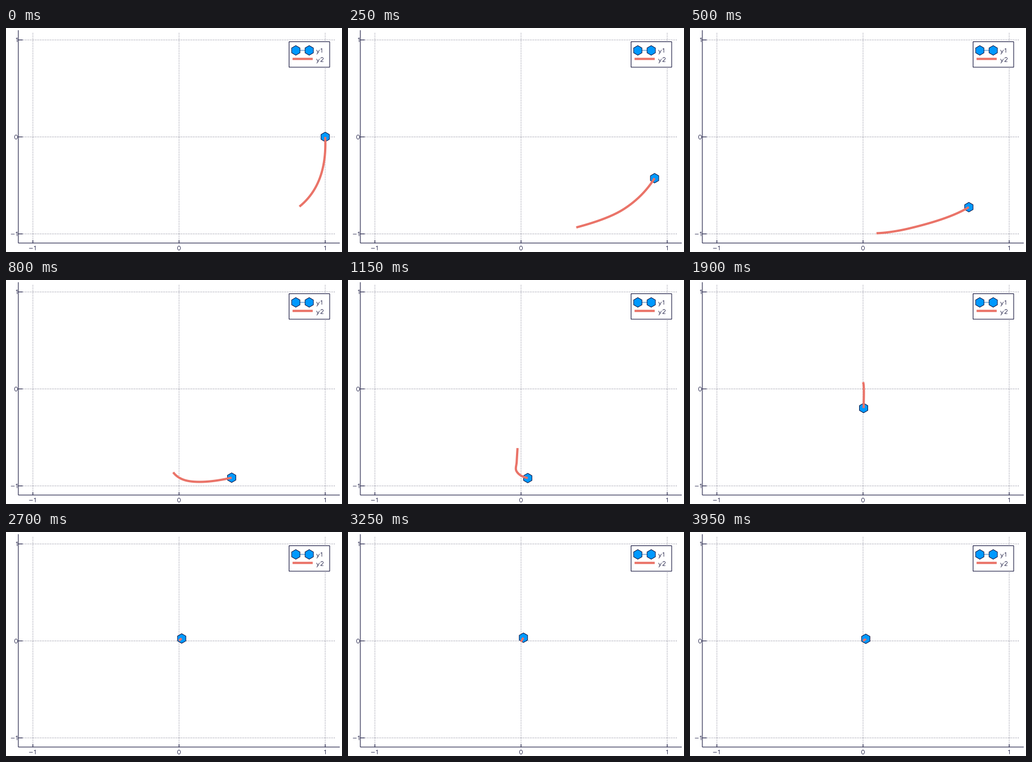
A matplotlib script for the animation above (4000 ms loop, 600 by 400 pixels).

```python
import numpy as np
import matplotlib.pyplot as plt
from matplotlib.animation import FuncAnimation
from matplotlib.patches import Rectangle, RegularPolygon

W, H, DPI = 600, 400, 100
PX = 72 / DPI
FRAMES, STEP, HORIZON = 80, 50, 10
INK, GRID, BLUE, RED = "#00002d", "#5c5c74", "#0099ff", "#ea7368"

plt.rcParams["path.snap"] = False

# waypoints: step, marker x, y, then where its forecast ends
T, *COLS = np.array([
    [0, 1, 0, .824, -.718],
    [10, .724, -.724, .092, -.993],
    [16, .36, -.915, -.04, -.86],
    [23, .046, -.919, -.024, -.61],
    [27, -.028, -.80, -.008, -.29],
    [30, -.022, -.676, 0, -.06],
    [38, .004, -.197, 0, .07],
    [46, .021, .01, 0, .02],
    [54, .018, .025, 0, .002],
    [80, .019, .02, 0, .002],
]).T


def spline(n, v):
    """Smooth curve through the waypoints v, sampled at steps n."""
    m = np.gradient(v, T, edge_order=2)
    n = np.clip(n, T[0], T[-1])
    i = np.clip(np.searchsorted(T, n, side="right") - 1, 0, len(T) - 2)
    h = T[i + 1] - T[i]
    u = (n - T[i]) / h
    blend = u * u * (3 - 2 * u)
    return (v[i] + blend * (v[i + 1] - v[i])
            + h * u * (1 - u) * ((1 - u) * m[i] - u * m[i + 1]))


def forecast(n):
    """The path ahead of step n, bent to reach the forecast end."""
    s = np.linspace(0, 1, 25)
    ahead = np.array([spline(n + HORIZON * s, v) for v in COLS[:2]])
    end = np.array([spline(n, v) for v in COLS[2:]])
    return ahead + s * (end - ahead[:, -1])[:, None]


def to_px(x, y):
    return 309 + 261 * x, 194.5 - 173.2 * y


fig = plt.figure(figsize=(W / DPI, H / DPI), dpi=DPI, facecolor="white")
ax = fig.add_axes([0, 0, 1, 1])
ax.set_xlim(0, W)
ax.set_ylim(H, 0)
ax.axis("off")


def stroke(x, y, color=INK, width=1, **kw):
    return ax.plot(x, y, color=color, lw=width * PX,
                   solid_capstyle="butt", **kw)[0]


def hexagon(x, y, z):
    return ax.add_patch(RegularPolygon((x, y), 6, radius=8.6, facecolor=BLUE,
                                       edgecolor=INK, lw=0.9 * PX, zorder=z))


# thin single-stroke glyphs: strokes above a baseline at 0, and the advance
ring = np.linspace(0, 2 * np.pi, 25)
bow = np.linspace(-np.pi, 0.6, 12)
GLYPHS = {
    "0": ([np.c_[2.7 + 2.7 * np.cos(ring), -4 + 4 * np.sin(ring)]], 8),
    "1": ([[(0, -6.4), (1, -6.8), (2.3, -8), (2.3, 0)]], 6),
    "2": ([[*np.c_[2.6 + 2.3 * np.cos(bow), -5.8 + 2.2 * np.sin(bow)],
            (0, 0), (5.2, 0)]], 8),
    "-": ([[(0, -3.7), (7, -3.7)]], 9.5),
    "y": ([[(0, -5.3), (2.7, 0)],
           [(5.4, -5.3), (2.7, 0), (1.6, 2), (0, 2.8)]], 7.8),
}


def label(text, x, y, size=0.93):
    for ch in text:
        lines, advance = GLYPHS[ch]
        for line in lines:
            gx, gy = size * np.transpose(line)
            stroke(x + gx, y + gy, width=0.75, zorder=8)
        x += size * advance


# grid, ticks and axes
dots = dict(color=GRID, linestyle=(0, (1, 2)), dash_capstyle="butt", zorder=1)
for v in (-1, 0, 1):
    x, y = to_px(v, v)
    stroke([x, x], [9, 384], **dots)
    stroke([22, 587], [y, y], **dots)
    stroke([x, x], [384, 379], zorder=3)
    stroke([22, 30], [y, y], zorder=3)
stroke([22, 22], [4, 384], zorder=2)
stroke([22, 596], [384, 384], zorder=2)

for text, x, y in (("-1", 41.3, 396.7), ("0", 306.4, 396.7), ("1", 568.3, 396.7),
                   ("1", 17.8, 25), ("0", 15.4, 198.4), ("-1", 8.8, 371.5)):
    label(text, x, y)

# legend
ax.add_patch(Rectangle((505.5, 24.5), 72.5, 45.5, facecolor="white",
                       edgecolor=INK, lw=PX, zorder=6))
stroke([511, 548], [40, 40], "#2f78c0", zorder=7)
for x in (517.5, 541.5):
    hexagon(x, 40, 8)
stroke([511.7, 547.7], [55.2, 55.2], RED, 4, zorder=7)
label("y1", 554.6, 44)
label("y2", 554.6, 60)

marker = hexagon(0, 0, 4)
path = stroke([], [], RED, 4, zorder=5, solid_joinstyle="round")


def update(n):
    x, y = to_px(*forecast(n))
    marker.xy = x[0], y[0]
    path.set_data(x, y)
    return marker, path


anim = FuncAnimation(fig, update, frames=FRAMES, interval=STEP,
                     repeat=True, repeat_delay=0, blit=False)
plt.show()
```
